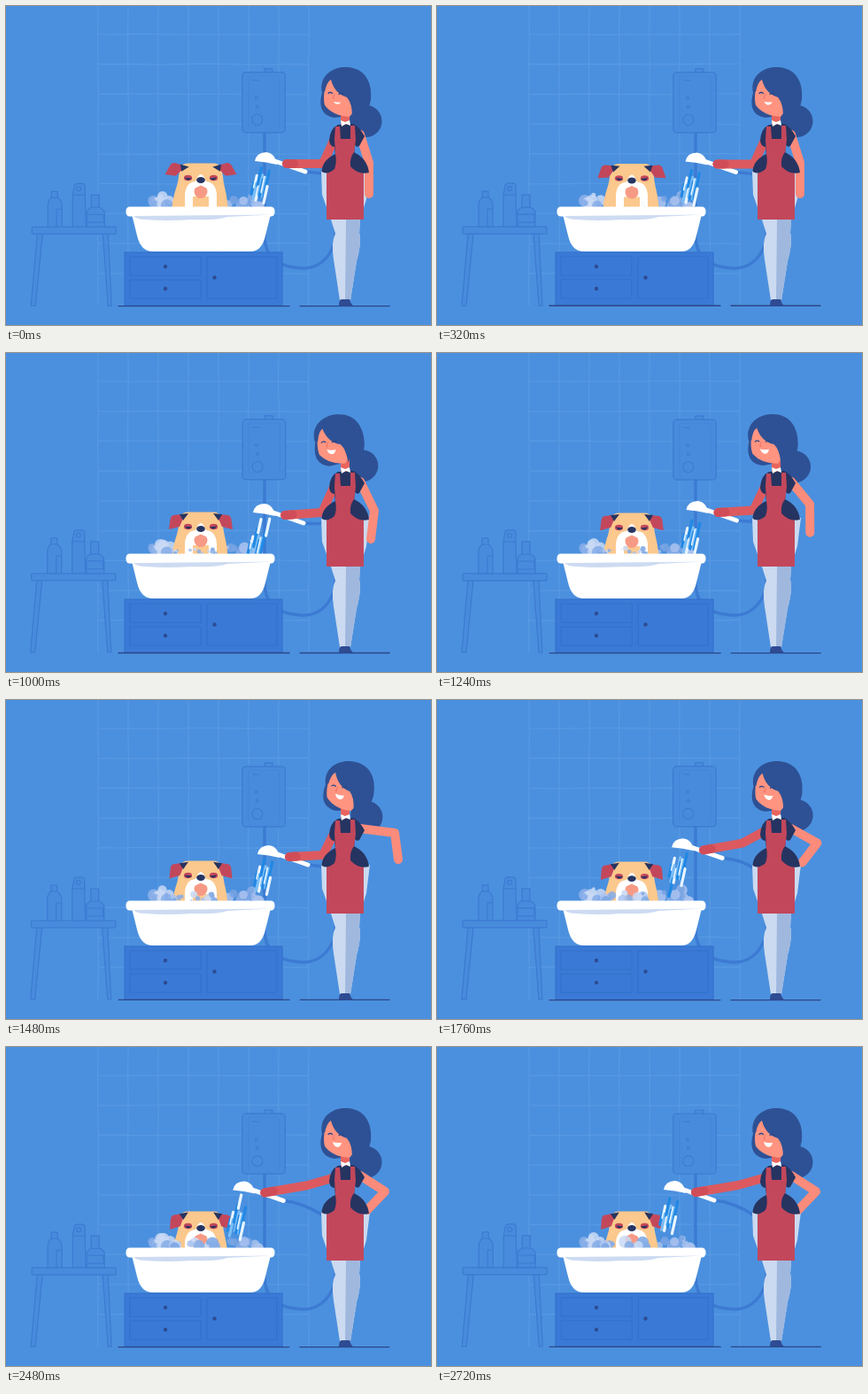
Animation of 480 by 360 pixels, one loop 2760 ms. Source, as an HTML page:

```html
<!DOCTYPE html>
<html lang="en">
<head>
<meta charset="utf-8">
<title>Bath time</title>
<style>
html, body { margin: 0; width: 100%; height: 100%; overflow: hidden; background: #4b90de; }
svg { display: block; width: 100vw; height: 100vh; }
.line { fill: #488bdc; stroke: #3c7ad2; stroke-width: 1.2; stroke-linejoin: round; }
.thin { fill: none; stroke: #3c7ad2; stroke-width: 1.1; }
.hose { fill: none; stroke: #3c7ad3; stroke-width: 3.4; stroke-linecap: round; }
.limb { fill: none; stroke-width: 10; stroke-linecap: round; stroke-linejoin: round; }
.panel { fill: #3a7ad6; stroke: #3571cc; stroke-width: 1.2; }
.hair { fill: #2e5195; }
.navy { fill: #263461; }
.knob { fill: #2e4b93; }
.red { fill: #c3475b; }
.skin { fill: #ff9480; }
.ink { fill: none; stroke: #2c4688; stroke-width: 1.3; stroke-linecap: round; }
</style>
</head>
<body>
<svg viewBox="0 0 480 360">
  <rect width="480" height="360" fill="#4b90de"/>
  <path id="tiles" fill="none" stroke="#5899e3" stroke-width="1.2"/>

  <g class="boil">
    <path class="line" d="M292 75v-4h9v4"/>
    <rect class="line" x="267" y="75" width="48.500" height="68" rx="4"/>
    <path class="thin" d="M274 137V82q0-3 3-3h29q3 0 3 3v55" opacity=".3"/>
    <path class="thin" d="M278 84h8"/>
    <circle class="thin" cx="284" cy="128.500" r="6"/>
    <circle class="thin" cx="283" cy="104" r="1.500"/>
    <circle class="thin" cx="284" cy="114" r="1.500"/>
  </g>
  <path class="hose" d="M292 144V258C292 282 303 294 335 296C354 296 365 284 371 268"/>

  <g class="boil">
    <path class="line" d="M35 257h6L33 338h-5zM109 257h6l4 81h-4z"/>
    <rect class="line" x="29" y="249" width="95" height="8" rx="1"/>
    <path class="line" d="M51 216v-7h7v7q5 3 5 9v24H47v-24q0-6 4-9z"/>
    <path class="thin" d="M51 216h7M57 249v-20h6"/>
    <path class="line" d="M75 249V213l2-10q0-3 4-3h5q3 0 3 4v9l1 36z"/>
    <path class="thin" d="M75 213h14"/>
    <circle class="thin" cx="82" cy="206" r="2.500"/>
    <path class="line" d="M96 227v-14h9v14q6 2 6 7v15H91v-15q0-5 5-7z"/>
    <path class="thin" d="M96 227h9M92 235h18v9H92"/>
  </g>

  <rect class="panel" x="134" y="278" width="178" height="60"/>
  <g class="boil">
    <path class="panel" d="M140 283h80v21h-80zM140 309h80v21h-80zM227 283h79v47h-79z"/>
    <path class="ink" d="M127 338.500h193M332 338.500h101"/>
  </g>
  <g class="knob">
    <circle cx="180" cy="294" r="2.200"/><circle cx="180" cy="319" r="2.200"/><circle cx="235.500" cy="306.500" r="2.200"/>
  </g>

  <g id="backFoam"></g>
  <g id="dog">
    <path fill="#fbc88d" d="M187 240C187 212 194 206 195 192L197 182Q199 177.500 206 177.500H234Q241 177.500 243 183L245 192C246 206 251 212 251 240z"/>
    <path fill="#fff" d="M217 192Q220 188 223 192L226 198Q237 199 238 213V240H229V215H211V240H202V213Q203 199 214 198z"/>
    <circle cx="220" cy="209.500" r="7.500" fill="#f79a85"/>
    <path fill="#fff" d="M207 205Q212 197 220 200Q228 197 233 205Q225 206 220 202.500Q215 206 207 205z"/>
    <ellipse class="navy" cx="220" cy="196.500" rx="4.800" ry="3.400"/>
    <g id="eye">
      <ellipse class="red" cx="205.500" cy="194" rx="4.600" ry="3.200"/>
      <path class="navy" d="M202 193.500l8 1q-3 3-6 1.500z"/>
    </g>
    <use href="#eye" transform="matrix(-1 0 0 1 440 0)"/>
    <g id="ear">
      <path class="red" d="M198 180L189 181Q186 182 185.500 186L184 197L196 194L200 185z"/>
      <path class="navy" d="M196 180L206 179L200 187z"/>
    </g>
    <use href="#ear" transform="matrix(-1 0 0 1 440 0)"/>
  </g>
  <g id="frontFoam"></g>
  <g id="water" stroke-width="3.200" stroke-linecap="round"></g>
  <path fill="#fff" d="M142 235L148 259Q152 277 166 277H276Q289 277 293 259L299 235z"/>
  <rect fill="#fff" x="135.500" y="226.500" width="168" height="11" rx="4.500"/>
  <path fill="#cddbf2" d="M144 237L300 235.500L250 238Q238 242 210 241Q180 243 158 241Q148 241 144 237z"/>

  <path class="hose" id="tube"/>
  <g class="head hair">
    <path d="M371 126C356 124 353 112 357 98C353 78 370 68 385 69C404 70 414 84 412 106L402 146Q388 142 388 124z"/>
    <circle cx="406.500" cy="130" r="18"/>
  </g>
  <path fill="#cbdaf0" d="M356 186L357 213L367 241L372 257Q367 266 370 286L377 332H389L396 288Q402 266 399 256L400 241L407 218L411 186z"/>
  <path fill="#a0b8de" d="M384 241H400L399 256Q402 266 396 288L389 332H383z"/>
  <path class="knob" d="M376 338.500Q376 331 379 331H388Q389 336 392 338.500z"/>
  <path class="limb" id="backArm" stroke="#fb8b7b"/>
  <g id="shower">
    <path d="M4 1L44 15" stroke="#fff" stroke-width="5" stroke-linecap="round"/>
    <path fill="#fff" d="M-13 3Q-11-7 0-7Q10-6 12 7Q0 4-13 3z"/>
  </g>
  <path class="limb" id="frontArm" stroke="#dc5a5f"/>
  <path class="limb" id="hand" stroke="#d04d58"/>
  <path fill="#e9645e" d="M378 118h10v18h-10z"/>
  <path class="navy" d="M375 134L392 133Q399 136 405 147L399 158Q396 160 394 157L393 168H372L371 159Q366 159 365 152Q366 138 375 134z"/>
  <path fill="#fff" d="M378 129L383 131L388 129L389 135L384 133L379 136z"/>
  <path class="red" d="M372 136h5l1 14h11V135h5l1 16L393 167Q402 176 404 190V241H362V190Q364 176 372 167L371 150z"/>
  <path class="navy" d="M372 167Q357 174 356.500 187Q363 191 371 184Q374 176 372 167zM393 165Q408 172 410 188Q398 191 389 181Q388 171 393 165z"/>
  <g class="head">
    <path class="skin" d="M364 83C359 92 358 104 360 112Q369 124 388 125L392 120L390 101Q372 98 367 82z"/>
    <path class="hair" d="M358 95Q360 76 374 75Q396 80 395 118L391 124Q391 110 385 103Q371 99 367 83Q362 86 360 97z"/>
    <path class="ink" d="M364 98.500q2-2 4.500 0M376 99.500q2.500-2 5 0"/>
    <path fill="none" stroke="#ee7568" d="M371 99l-2 5h2"/>
    <path id="smile" fill="#fff" d="M-5-2Q0 0 5-1Q4 4 0 4Q-4 3-5-2z"/>
  </g>
</svg>
<script>
const LOOP = 2760, STEP = 40;
const $ = id => document.getElementById(id);
const set = (el, name, value) => el.setAttribute(name, value);
const rand = n => { const s = Math.sin(n * 127.1 + 31.7) * 43758.5453; return s - Math.floor(s); };
const jit = (n, a) => (rand(n) - .5) * 2 * a;

// Eased value between [time, ...numbers] stops.
function key(t, stops) {
  let i = 0;
  while (i < stops.length - 2 && t >= stops[i + 1][0]) i++;
  const [a, b] = [stops[i], stops[i + 1]];
  const p = Math.min(1, Math.max(0, (t - a[0]) / (b[0] - a[0])));
  const e = p * p * (3 - 2 * p);
  return a.slice(1).map((v, k) => v + (b[k + 1] - v) * e);
}

function add(parent, tag, attrs) {
  const el = document.createElementNS('http://www.w3.org/2000/svg', tag);
  for (const k in attrs) set(el, k, attrs[k]);
  parent.appendChild(el);
  return el;
}

const tracks = {
  shower: [[0, 294, 172], [640, 293, 173], [1000, 292, 177], [1480, 297, 171], [1920, 270, 160], [2720, 269, 158]],
  frontElbow: [[0, 358, 178], [1000, 357, 180], [1480, 358, 175], [1900, 340, 157], [2720, 340, 156]],
  backElbow: [[0, 410, 177], [640, 410, 177], [1000, 416, 178], [1200, 420, 172], [1480, 439, 150], [1840, 428, 163]],
  backHand: [[0, 410, 212], [640, 410, 212], [1000, 412, 210], [1200, 420, 204], [1480, 443, 180], [1840, 408, 184]],
  head: [[0, 0, 0], [640, 0, 0], [1000, -7, -4], [1160, -6, -3], [1480, 5, 1], [1840, 0, 0]],
  smile: [[0, .45], [200, .5], [520, 1]],
  dog: [[0, 0], [640, 1], [1000, 2], [1480, 4], [2000, 6], [2480, 8]],
  ear: [[0, 22], [560, 4], [1000, 0], [2000, -4]]
};

const bubbles = [];
for (let i = 0; i < 46; i++) {
  const front = i >= 30;
  const side = i % 2;
  const x = front ? 186 + rand(i) * 68 : side ? 248 + rand(i) * 38 : 163 + rand(i) * 34;
  const el = add($(front ? 'frontFoam' : 'backFoam'), 'circle', {
    fill: ['#86ade8', '#a9c2ee', '#c9d9f5', '#79a5e3'][i % 4], opacity: .85
  });
  bubbles.push({ el, x, y: 227 - rand(i + 60) * (front ? 5 : 11), r: 4.500 + rand(i + 90) * 4.500, front, i });
}
const drops = Array.from({ length: 11 }, (_, i) =>
  add($('water'), 'line', { stroke: ['#2188e4', '#e9f5ff', '#79bdf5'][i % 3] }));

function wavy(x, y, dx, dy, n, seed) {
  let d = `M${x} ${y}`;
  for (let i = 1; i <= n; i++) {
    const w = jit(seed + i * 3, .5);
    d += `L${x + dx * i + (dy ? w : 0)} ${y + dy * i + (dx ? w : 0)}`;
  }
  return d;
}

function drawWall(beat) {
  let d = '';
  for (let i = 0; i < 8; i++) d += wavy(104 + i * 34, 0, 0, 33.800, 10, i * 40 + beat * 7);
  for (let i = 0; i < 9; i++) d += wavy(104, 32 + i * 33.700, 34, 0, 7, 500 + i * 40 + beat * 7);
  set($('tiles'), 'd', d);
  document.querySelectorAll('.boil').forEach((g, i) =>
    set(g, 'transform', `translate(${jit(beat * 5 + i, .3)} ${jit(beat * 9 + i, .3)})`));
}

function drawFoam(t) {
  for (const b of bubbles) {
    const p = (t / 1380 + rand(b.i + 200)) % 1;
    const grow = b.front ? key(t, [[0, 0], [1200, .35], [2000, .85]])[0] : .9;
    const pulse = b.i % 3 ? .85 + .15 * Math.sin(p * 2 * Math.PI) : Math.sin(p * Math.PI);
    const rise = b.i % 3 ? 0 : p * 6;
    set(b.el, 'cx', b.x + Math.sin(p * 6.283) * .8);
    set(b.el, 'cy', b.y - rise);
    set(b.el, 'r', b.r * grow * pulse);
  }
}

function drawWater(t, x, y) {
  drops.forEach((el, i) => {
    const p = (t / 300 + rand(i + 5)) % 1;
    const top = y + 8 + p * 32, len = 12 + rand(i + 20) * 18;
    const left = x - 8 + i * 1.600;
    const slant = v => left - (v - y) * .22;
    const end = Math.min(top + len, 226);
    set(el, 'x1', slant(top)); set(el, 'y1', top);
    set(el, 'x2', slant(end)); set(el, 'y2', end);
  });
}

function draw(t) {
  const now = {};
  for (const name in tracks) now[name] = key(t, tracks[name]);
  const [sx, sy] = now.shower;
  const [ex, ey] = now.frontElbow;
  const [tilt, shift] = now.head;
  const hx = sx + 23, hy = sy + 6;
  drawWall(Math.floor(t / 120));
  drawFoam(t);
  drawWater(t, sx, sy);
  set($('shower'), 'transform', `translate(${sx} ${sy})`);
  set($('tube'), 'd', `M${sx + 44} ${sy + 15}Q${sx + 66} ${sy + 17} 358 190Q374 216 372 266`);
  set($('frontArm'), 'd', `M372 147L${ex} ${ey}L${hx} ${hy}`);
  set($('hand'), 'd', `M${hx} ${hy}L${hx + (ex - hx) * .2} ${hy + (ey - hy) * .2}`);
  set($('backArm'), 'd', `M400 145L${now.backElbow}L${now.backHand}`);
  document.querySelectorAll('.head').forEach(g =>
    set(g, 'transform', `translate(${shift}) rotate(${tilt} 384 130)`));
  set($('smile'), 'transform', `translate(374 109) scale(${.7 + now.smile * .3} ${now.smile})`);
  set($('dog'), 'transform', `translate(0 ${now.dog})`);
  set($('ear'), 'transform', `rotate(${now.ear} 200 182)`);
}

const start = performance.now();
function tick() {
  const t = (performance.now() - start) % LOOP;
  draw(Math.floor(t / STEP) * STEP);
  requestAnimationFrame(tick);
}
tick();
</script>
</body>
</html>
```
